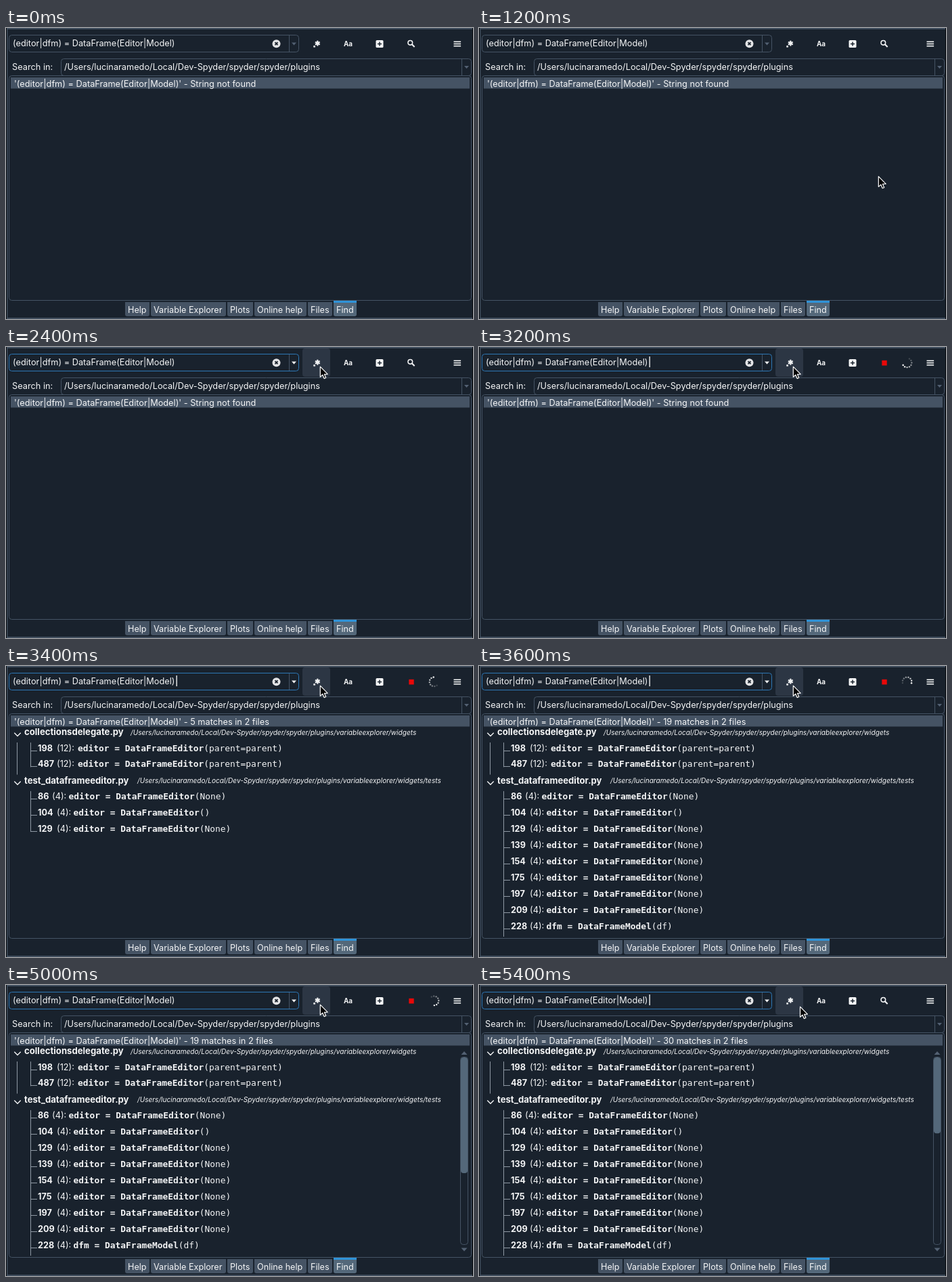
An HTML page with a canvas that plays this animation: 690x430 px, repeating every 6.8 s.

```html
<!DOCTYPE html>
<html lang="en">
<head>
<meta charset="utf-8">
<title>Find pane</title>
<style>
html, body { margin: 0; width: 100%; height: 100%; overflow: hidden; background: #19222d; }
canvas { display: block; width: 690px; height: 430px; }
</style>
</head>
<body>
<canvas id="stage" width="690" height="430"></canvas>
<script>
const ctx = document.getElementById('stage').getContext('2d');
const LOOP = 6800, STEP = 200;
const BG = '#19222d', EDGE = '#455364', INK = '#f4f5f6', DIM = '#536173';
const ACTIVE = '#54687a', TREE = '#8f99a4', RIM = '#3f4c5c';
const SANS = 'Inter, sans-serif', MONO = '"DejaVu Sans Mono", monospace';
const ROW = 23.92, FIRST_ROW = 97.6;
const QUERY = '(editor|dfm) = DataFrame(Editor|Model)';
const ROOT = '/Users/lucinaramedo/Local/Dev-Spyder/spyder/spyder/plugins';

const editor = arg => ['editor = DataFrameEditor', arg];
const FILES = [
  { name: 'collectionsdelegate.py', dir: '/variableexplorer/widgets', dirX: 184, col: 12,
    hits: [198, 487].map(n => [n, ...editor('(parent=parent)')]) },
  { name: 'test_dataframeeditor.py', dir: '/variableexplorer/widgets/tests', dirX: 194, col: 4,
    hits: [
      ...[86, 104, 129, 139, 154, 175, 197, 209].map(n => [n, ...editor(n === 104 ? '()' : '(None)')]),
      [228, 'dfm = DataFrameModel', '(df)']
    ] }
];
const TABS = [
  ['Help', 176, 36], ['Variable Explorer', 214, 111], ['Plots', 327, 38],
  ['Online help', 367, 77], ['Files', 446, 36], ['Find', 484, 34]
];

// [start, value] lists; the last entry already started is in force
const MATCHES = [[0, 0], [3400, 5], [3600, 19], [5200, 30]];
const CARET = [[0, 0], [2000, 1], [2400, 0], [3000, 1], [3800, 0], [4200, 1], [4600, 0], [5400, 1]];
const POINTER = [
  [0, null], [1000, [612.5, 228.5]], [1200, [589.8, 218.8]], [1400, [481.5, 57.5]],
  [1600, [480.5, 56]], [1800, [463.8, 28.6]], [5400, [474, 31.6]]
];
const at = (list, t) => list.filter(k => k[0] <= t).pop()[1];

function text(str, x, y, size = 12.75, weight = 400, family = SANS, color = INK) {
  ctx.font = `${weight} ${size}px ${family}`;
  ctx.fillStyle = color;
  ctx.fillText(str, x, y);
}

function rect(x, y, w, h, color) {
  ctx.fillStyle = color;
  ctx.fillRect(x, y, w, h);
}

function box(x, y, w, h, r, fill, stroke) {
  ctx.beginPath();
  ctx.roundRect(x, y, w, h, r);
  if (fill) { ctx.fillStyle = fill; ctx.fill(); }
  if (stroke) { ctx.strokeStyle = stroke; ctx.lineWidth = 1; ctx.stroke(); }
}

function line(points, color, width = 1) {
  ctx.beginPath();
  points.forEach(p => ctx.lineTo(...p));
  ctx.strokeStyle = color;
  ctx.lineWidth = width;
  ctx.stroke();
}

function disc(x, y, r, color) {
  ctx.beginPath();
  ctx.arc(x, y, r, 0, Math.PI * 2);
  ctx.fillStyle = color;
  ctx.fill();
}

function triangle(x, y, w, h, color) {
  ctx.beginPath();
  ctx.moveTo(x - w / 2, y - h / 2);
  ctx.lineTo(x + w / 2, y - h / 2);
  ctx.lineTo(x, y + h / 2);
  ctx.fillStyle = color;
  ctx.fill();
}

function drawFrame() {
  rect(0, 0, 690, 430, BG);
  rect(2, 0, 687, 2, RIM);
  rect(2, 428, 687, 2, RIM);
  rect(1, 0, 1.5, 430, RIM);
  rect(0, 0, 1, 430, '#06090c');
  rect(689, 0, 1, 430, '#06090c');
}

function drawInputs(focused, caret) {
  box(4.5, 10.5, 428, 25, 4, null, focused ? '#2d77b5' : EDGE);
  line([[418.5, 11], [418.5, 35]], EDGE);
  triangle(425.5, 23.5, 7, 4, focused ? INK : DIM);
  text(QUERY, 10, 27);
  if (caret) rect(251.5, 14, 1.3, 16, '#fff');

  disc(399.5, 23.2, 6, '#e3e4e6');
  line([[397.5, 21.2], [401.5, 25.2]], BG, 1.7);
  line([[401.5, 21.2], [397.5, 25.2]], BG, 1.7);

  text('Search in:', 9, 62.3);
  box(81.5, 45.5, 606, 25, 4, null, EDGE);
  line([[673.5, 46], [673.5, 70]], EDGE);
  triangle(680.5, 58, 7, 4, DIM);
  text(ROOT, 86, 62.3);
}

function drawSpinner(t) {
  const turn = (150 + (t - 3200) * 0.5652) * Math.PI / 180;
  for (let i = 0; i < 8; i++) {
    const a = turn - i * Math.PI / 6;
    ctx.globalAlpha = 1 - i / 8.5;
    disc(632.5 + 6.8 * Math.cos(a), 23.3 + 6.8 * Math.sin(a), 1.2, '#fff');
  }
  ctx.globalAlpha = 1;
}

function drawToolbar(t, hovered, busy) {
  if (hovered) box(438, 2, 41, 42, 4, '#2c3644');
  rect(454.3, 26, 2.6, 2.6, INK);
  for (let i = 0; i < 3; i++) {
    const a = Math.PI / 2 + i * Math.PI / 3, dx = 3.9 * Math.cos(a), dy = 3.9 * Math.sin(a);
    line([[460.3 - dx, 22.6 - dy], [460.3 + dx, 22.6 + dy]], INK, 2.2);
  }
  text('Aa', 499, 27.4, 9.8, 700);
  box(546.5, 18, 11, 11, 1.5, INK);
  line([[552, 20.4], [552, 26.6]], BG, 1.5);
  line([[548.9, 23.5], [555.1, 23.5]], BG, 1.5);
  if (busy) {
    rect(595.3, 19.8, 7.4, 7.6, '#e80808');
    drawSpinner(t);
  } else {
    ctx.beginPath();
    ctx.arc(597.3, 21.8, 3.3, 0, Math.PI * 2);
    ctx.strokeStyle = INK;
    ctx.lineWidth = 1.6;
    ctx.stroke();
    line([[599.6, 24.1], [603.6, 28.1]], INK, 2.1);
  }
  for (let i = 0; i < 3; i++) rect(661.5, 19.5 + i * 3.2, 10.6, 1.6, INK);
}

function drawFile(file, row, count, more) {
  const y = FIRST_ROW + row * ROW;
  line([[12.3, y + 1.2], [17, y + 5.8], [21.7, y + 1.2]], INK, 1.4);
  text(file.name, 27, y + 4.3, 13.15, 700);
  text(ROOT + file.dir, file.dirX, y + 4, 10.1, 'italic 400');
  const hits = file.hits.slice(0, count);
  hits.forEach(([num, bold, rest], i) => {
    const base = y + (i + 1) * ROW + 4;
    const colX = num < 100 ? 68 : 75;
    const codeX = colX + (file.col > 9 ? 31 : 24.5);
    const tick = Math.round(base) - 0.5;
    line([[37, tick], [46, tick]], TREE);
    text(num, 47, base, 12.7, 700);
    text(`(${file.col}):`, colX, base);
    text(bold, codeX, base, 12.9, 700, MONO);
    text(rest, codeX + ctx.measureText(bold).width, base, 12.9, 400, MONO);
  });
  const end = more ? 400 : y + hits.length * ROW + 4;
  line([[36.5, y + 15.5], [36.5, end]], TREE);
}

function drawScrollbar(matches) {
  triangle(677, 100.5, 9, -5, DIM);
  triangle(677, 391, 9, 5, DIM);
  box(671.5, 106.5, 11, 277, 4, null, EDGE);
  box(672, 107, 10, 277 * 311 / ((matches + 2) * 24), 4, ACTIVE);
}

function drawResults(t, matches) {
  box(4.5, 70.5, 683, 332, 4, null, EDGE);
  rect(7, 73, 678, 16.5, EDGE);
  const outcome = matches ? `${matches} matches in 2 files` : 'String not found';
  text(`'${QUERY}' - ${outcome}`, 12, 86.5);
  if (!matches) return;
  ctx.save();
  ctx.beginPath();
  ctx.rect(6, 90, 680, 311);
  ctx.clip();
  line([[16.5, 113], [16.5, 160.5]], TREE);
  drawFile(FILES[0], 0, 2, false);
  drawFile(FILES[1], 3, matches - 2, matches > 11);
  ctx.restore();
  if (t >= 3800) drawScrollbar(matches);
}

function drawTabs() {
  for (const [label, x, w] of TABS) {
    const current = label === 'Find';
    box(x, 405, w, 21, [0, 0, 3, 3], current ? ACTIVE : EDGE);
    if (current) rect(x, 403, w, 3, '#2f93d8');
    text(label, x + 4, 420.5, 12.65);
  }
}

function drawPointer([x, y]) {
  ctx.save();
  ctx.translate(x, y);
  ctx.beginPath();
  [[0.5, 0.5], [0.5, 15.8], [4, 12.6], [6.3, 18], [8.9, 16.9], [6.6, 11.7], [11.4, 11.5]]
    .forEach(p => ctx.lineTo(...p));
  ctx.closePath();
  ctx.fillStyle = '#000';
  ctx.fill();
  ctx.strokeStyle = '#fff';
  ctx.lineWidth = 1.2;
  ctx.lineJoin = 'round';
  ctx.stroke();
  ctx.restore();
}

function draw(now) {
  const t = Math.floor((now % LOOP) / STEP) * STEP;
  const clicked = t >= 2000;
  drawFrame();
  drawInputs(clicked, at(CARET, t));
  drawToolbar(t, clicked, t >= 3000 && t < 5200);
  drawResults(t, at(MATCHES, t));
  drawTabs();
  const pointer = at(POINTER, t);
  if (pointer) drawPointer(pointer);
}

const start = performance.now();
function tick() {
  draw(performance.now() - start);
  requestAnimationFrame(tick);
}
tick();
</script>
</body>
</html>
```
